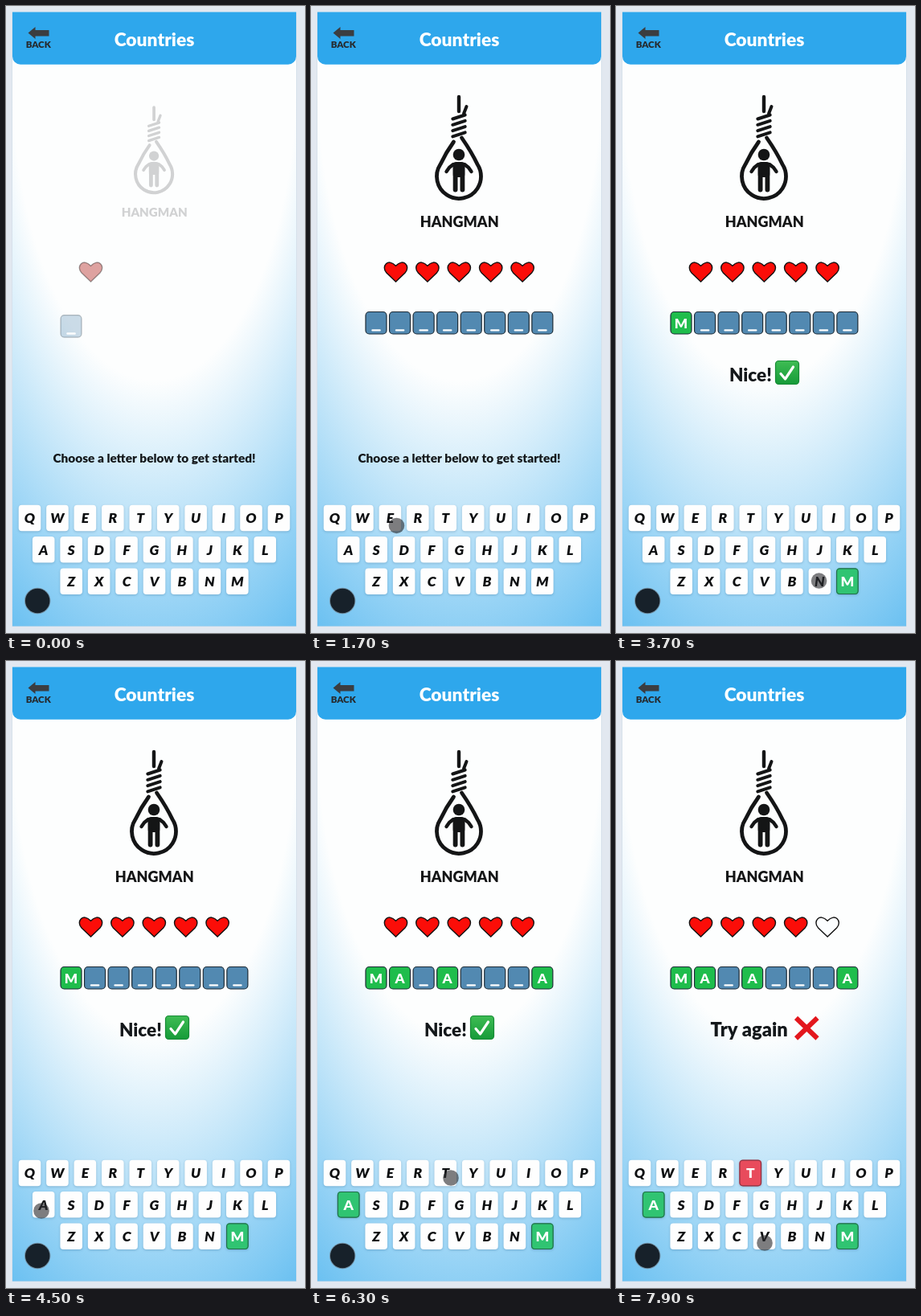
Animation of 372x780 px, one loop 8000 ms. Source, as an HTML page with a canvas:

```html
<!DOCTYPE html>
<html lang="en">
<head>
<meta charset="utf-8">
<title>Hangman</title>
<style>
html, body { margin: 0; width: 100%; height: 100%; overflow: hidden; background: #e2e8f0; }
canvas { display: block; width: 372px; height: 780px; }
</style>
</head>
<body>
<canvas id="stage"></canvas>
<script>
const W = 372, H = 780, LOOP = 8000;
const canvas = document.getElementById('stage');
const ctx = canvas.getContext('2d');
const dpr = window.devicePixelRatio || 1;
canvas.width = W * dpr;
canvas.height = H * dpr;

const BLUE = '#2ea7ec', INK = '#14181b';
const CARD = { x: 8, y: 7.5, w: 353, h: 764 };
const WORD = 'MA_A___A';
const ROWS = [['QWERTYUIOP', 29.5, 637], ['ASDFGHJKL', 46.7, 676.3], ['ZXCVBNM', 81.2, 715.7]];
const GUESSES = { M: [3100, true], A: [4750, true], T: [6600, false] };
const MISS = GUESSES.T[0];

// time, x, y
const PATH = [
  [1100, -12, 600], [2500, 289, 718], [2900, 291, 721], [3500, 291, 721],
  [4300, 45, 683], [4500, 44, 684], [4950, 44, 684], [5600, 172, 653],
  [6200, 174, 643], [6900, 174, 643], [7800, 185, 724], [8000, 185, 724]
];

const clamp = v => Math.max(0, Math.min(1, v));
const easeOut = u => 1 - (1 - u) * (1 - u);
const easeInOut = u => u * u * (3 - 2 * u);

function text(str, x, y, size, color, style = '900', align = 'center') {
  ctx.font = `${style} ${size}px Lato, "Open Sans", sans-serif`;
  ctx.textAlign = align;
  ctx.fillStyle = color;
  ctx.fillText(str, x, y);
}

function box(x, y, w, h, r, fill, stroke) {
  ctx.beginPath();
  ctx.roundRect(x, y, w, h, r);
  ctx.fillStyle = fill;
  ctx.fill();
  if (stroke) {
    ctx.strokeStyle = stroke;
    ctx.lineWidth = 1.2;
    ctx.stroke();
  }
}

function disc(x, y, r, fill) {
  ctx.beginPath();
  ctx.arc(x, y, r, 0, Math.PI * 2);
  ctx.fillStyle = fill;
  ctx.fill();
}

function line(width, color, ...pts) {
  ctx.beginPath();
  pts.forEach(p => ctx.lineTo(p[0], p[1]));
  ctx.lineWidth = width;
  ctx.strokeStyle = color;
  ctx.stroke();
}

function scaledAt(x, y, s, draw) {
  ctx.save();
  ctx.translate(x, y);
  ctx.scale(s, s);
  ctx.translate(-x, -y);
  draw();
  ctx.restore();
}

function backdrop() {
  const { x, y, w, h } = CARD;
  ctx.fillStyle = '#e2e8f0';
  ctx.fillRect(0, 0, W, H);
  ctx.fillStyle = '#cbd9e6';
  ctx.fillRect(x - 0.5, y, w + 1, h + 0.5);
  ctx.save();
  ctx.beginPath();
  ctx.rect(x, y, w, h);
  ctx.clip();
  ctx.translate(x + w / 2, y + h * 0.1);
  ctx.scale(w * 1.25, h * 1.25);
  const g = ctx.createRadialGradient(0, 0, 0, 0, 0, 1);
  g.addColorStop(0, '#fdfefe');
  g.addColorStop(0.4, '#fdfefe');
  g.addColorStop(1, BLUE);
  ctx.fillStyle = g;
  ctx.fillRect(-1, -1, 2, 2);
  ctx.restore();
}

function header() {
  box(CARD.x, CARD.y, CARD.w, 65.3, [0, 0, 10, 10], BLUE);
  text('Countries', 184.5, 49.8, 22.8, '#fff');
  ctx.beginPath();
  [[27.5, 33.5], [36.5, 26], [36.5, 30], [53.5, 30], [53.5, 37.5], [36.5, 37.5], [36.5, 41]]
    .forEach(p => ctx.lineTo(p[0], p[1]));
  ctx.fillStyle = '#3b3d40';
  ctx.fill();
  text('BACK', 40.2, 52, 11.5, '#26292c');
}

function noose(t) {
  const p = easeOut(clamp((t + 50) / 500));
  const v = Math.round(20 + (1 - p) * 233);
  const c = `rgb(${v},${v + 1},${v + 2})`;
  scaledAt(184.5, 194.5, 0.8 + 0.2 * p, () => {
    ctx.lineCap = ctx.lineJoin = 'round';
    line(4.4, c, [184, 113], [184, 131]);
    line(4, c, [193.5, 125], [190, 134]);
    for (let i = 0; i < 4; i++) {
      const y = 140.5 + i * 7.3;
      line(4, c, [176.3, y], [191.7, y - 5]);
    }
    // rope loop: slightly bowed sides around a round bottom
    ctx.beginPath();
    ctx.moveTo(177.5, 169);
    ctx.quadraticCurveTo(168, 182, 161, 197);
    ctx.arc(184, 212, 27.5, Math.PI * 1.183, -Math.PI * 0.183, true);
    ctx.quadraticCurveTo(200, 182, 187.5, 164);
    ctx.lineWidth = 4.8;
    ctx.strokeStyle = c;
    ctx.stroke();
    disc(184, 185, 7.3, c);
    box(176.5, 194, 15, 19, 4, c);
    line(4.4, c, [177, 197], [172, 201], [168.5, 206]);
    line(4.4, c, [191, 197], [196, 201], [199.5, 206]);
    line(5.8, c, [179.6, 211], [179.6, 228.5]);
    line(5.8, c, [188.4, 211], [188.4, 228.5]);
    text('HANGMAN', 184.7, 274.5, 18, c);
  });
}

function hearts(t) {
  for (let i = 0; i < 5; i++) {
    const a = clamp((t - i * 110 + 100) / 260);
    ctx.save();
    ctx.globalAlpha = a;
    ctx.translate(105.5 + i * 39.4, 330.8);
    ctx.beginPath();
    ctx.moveTo(0, 12.3);
    ctx.lineTo(-11.5, 1.2);
    ctx.bezierCurveTo(-19, -7, -9.5, -18, 0, -7.5);
    ctx.bezierCurveTo(9.5, -18, 19, -7, 11.5, 1.2);
    ctx.closePath();
    ctx.fillStyle = i === 4 && t >= MISS ? '#fcfeff' : `rgb(${125 + 126 * a},13,8)`;
    ctx.fill();
    ctx.lineWidth = 1.4;
    ctx.strokeStyle = '#111';
    ctx.stroke();
    ctx.restore();
  }
}

function tiles(t) {
  for (let i = 0; i < 8; i++) {
    const age = t - i * 95 + 50;
    if (age <= 0) continue;
    const x = 68 + i * 29.55;
    const y = 380.5 + 14 * Math.exp(-age / 60) * Math.cos(age / 60);
    const ch = WORD[i];
    const open = ch !== '_' && t >= GUESSES[ch][0];
    ctx.globalAlpha = clamp(age / 170);
    box(x, y, 26, 27.5, 4.5, open ? '#1fbd4c' : '#5289b1', '#1d2b36');
    ctx.globalAlpha = 1;
    if (open) text(ch, x + 13, y + 20.5, 17, '#fff');
    else box(x + 7.3, y + 21.7, 11.5, 2.4, 1, '#fff');
  }
}

function tick() {
  const g = ctx.createLinearGradient(0, 441, 0, 471);
  g.addColorStop(0, '#3fbd54');
  g.addColorStop(1, '#159a38');
  box(198.5, 441.5, 29, 29, 4, g, '#178a36');
  ctx.lineCap = ctx.lineJoin = 'round';
  line(3.2, '#fff', [205, 457.5], [210.5, 464], [220.5, 449]);
}

function cross() {
  ctx.lineCap = 'butt';
  line(6, '#e3171d', [224, 444], [250.5, 469.5]);
  line(6, '#e3171d', [250.5, 444], [224, 469.5]);
}

function message(t) {
  const first = GUESSES.M[0];
  if (t < first) {
    text('Choose a letter below to get started!', 184.5, 567.5, 15.4, INK);
    return;
  }
  const miss = t >= MISS;
  const p = easeOut(clamp((t - (miss ? MISS + 100 : first)) / 300));
  ctx.globalAlpha = p;
  scaledAt(184.5, 457, 0.8 + 0.2 * p, () => {
    if (miss) {
      text('Try again', 117.5, 467, 23.6, INK, '900', 'left');
      cross();
    } else {
      text('Nice!', 141, 466.5, 22.5, INK, '900', 'left');
      tick();
    }
  });
  ctx.globalAlpha = 1;
}

function keyboard(t) {
  for (const [letters, x0, cy] of ROWS) {
    [...letters].forEach((ch, i) => {
      const x = x0 + i * 34.44;
      const guess = GUESSES[ch];
      const used = guess && t >= guess[0];
      let fill = '#fefefe', edge = null;
      if (used) [fill, edge] = guess[1] ? ['#30c472', '#236b4b'] : ['#e84b5c', '#8b3543'];
      ctx.save();
      ctx.shadowColor = 'rgba(30,80,120,.28)';
      ctx.shadowBlur = 3 * dpr;
      ctx.shadowOffsetY = dpr;
      box(x - 13.8, cy - 16.2, 27.6, 32.4, 4, fill);
      ctx.restore();
      if (edge) box(x - 13.3, cy - 15.8, 26.6, 31.6, 4, fill, edge);
      text(ch, x, cy + 6.4, 17.5, used ? '#fff' : '#0c0e10', used ? '900' : 'italic 900');
    });
  }
}

function cursor(t) {
  if (t < PATH[0][0]) return;
  let i = 0;
  while (i < PATH.length - 2 && t >= PATH[i + 1][0]) i++;
  const [t0, x0, y0] = PATH[i], [t1, x1, y1] = PATH[i + 1];
  const u = easeInOut(clamp((t - t0) / (t1 - t0)));
  disc(x0 + (x1 - x0) * u, y0 + (y1 - y0) * u, 9.8, 'rgba(45,45,48,.62)');
}

function frame(now) {
  const t = now % LOOP;
  ctx.setTransform(dpr, 0, 0, dpr, 0, 0);
  backdrop();
  header();
  noose(t);
  hearts(t);
  tiles(t);
  message(t);
  keyboard(t);
  disc(39.2, 740, 16.2, 'rgba(110,130,145,.8)');
  disc(39.2, 740, 15.2, '#17212a');
  cursor(t);
}

let start = null;
function loop(now) {
  if (start === null) start = now;
  frame(now - start);
  requestAnimationFrame(loop);
}
frame(0);
requestAnimationFrame(loop);
</script>
</body>
</html>
```
